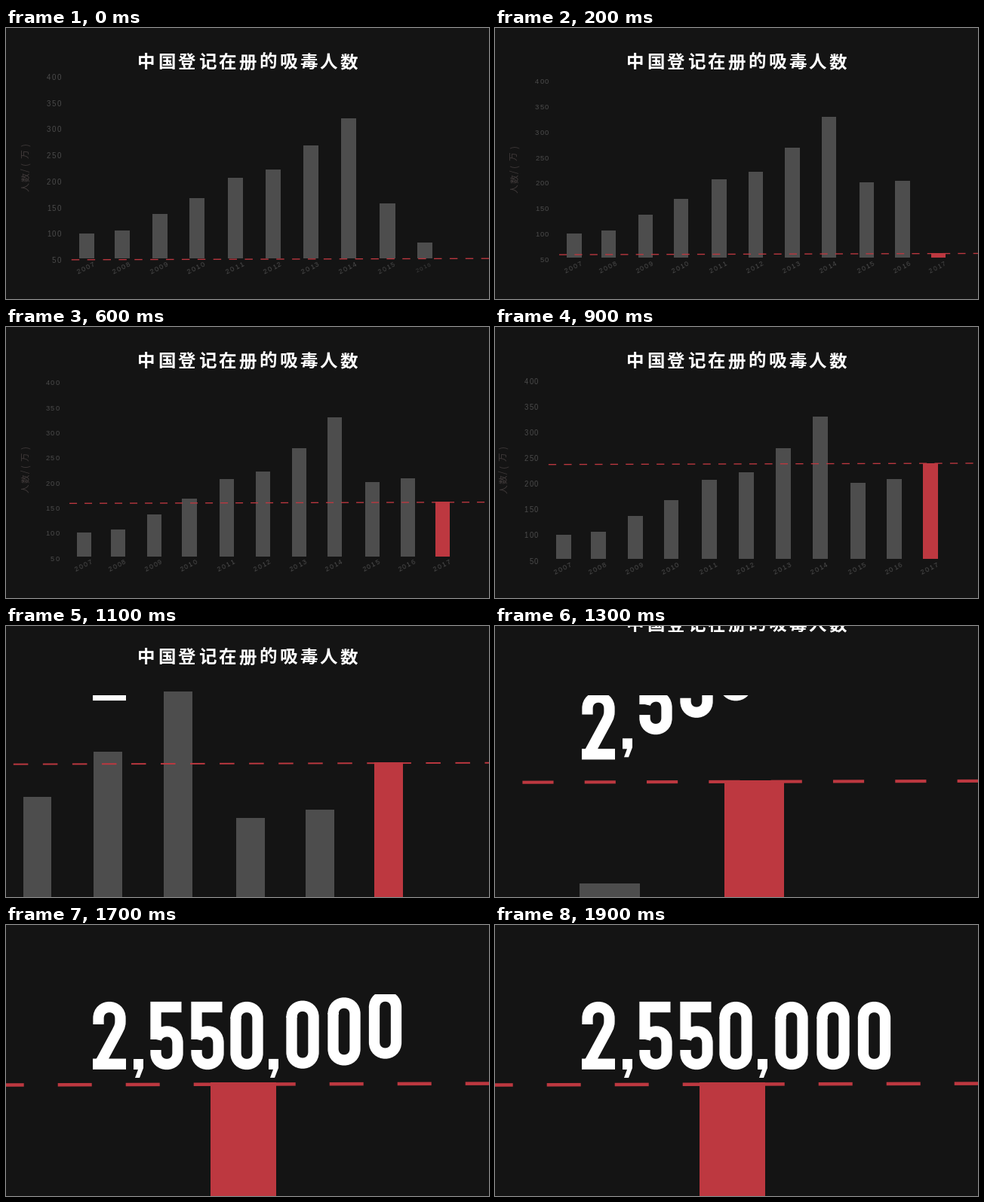
Write a matplotlib script that moves like this. It is 640 px wide and 360 px high and loops after 2 s.

```python
from math import cos, radians, sin

import matplotlib.pyplot as plt
from matplotlib.animation import FuncAnimation
from matplotlib.patches import PathPatch, Polygon, Rectangle
from matplotlib.path import Path

W, H, DPI = 640, 360, 80
PT = 72 / DPI
FRAMES, STEP = 20, 100

BG, GREY, RED, WHITE = "#141414", "#4d4d4d", "#bd3840", "#ffffff"
LABEL, AXIS_NAME = "#4b4b4b", "#403a3a"
SANS, CJK = "Liberation Sans", "Noto Sans CJK JP"

TITLE = "中国登记在册的吸毒人数"
YEARS = range(2007, 2018)
# bar centres from the first bar, and full heights, in chart units
CENTRES = [0, 45, 92.9, 139.4, 188.8, 236.7, 284.6, 332.1, 381.5, 428.5, 475]
HEIGHTS = [31.5, 35.5, 56, 76.5, 102.5, 112.5, 143.5, 184.5, 98.5, 104, 137.4]
BAR_W = 19.3
NAME = list(zip("人数/(万)", (27, 14, 5, -3, -15, -27)))

NUMBER = "2,550,000"
NUMBER_X = [115, 168, 191, 245, 297.5, 347, 371.5, 426.5, 481]
NUMBER_TOP, CLIP_TOP = 102, 92
STROKE = 14.3

fig = plt.figure(figsize=(W / DPI, H / DPI), dpi=DPI, facecolor=BG)
ax = fig.add_axes([0, 0, 1, 1])


def ease(t, start, length, a, b):
    u = min(max((t - start) / length, 0), 1)
    return 1 - (1 - u ** a) ** b


def curve(spec):
    """Build a path from (code, x, y, ...) steps."""
    codes = {"M": [Path.MOVETO], "L": [Path.LINETO], "C": [Path.CURVE4] * 3}
    verts, kinds = [], []
    for code, *xy in spec:
        verts += list(zip(xy[::2], xy[1::2]))
        kinds += codes[code]
    return Path(verts, kinds)


GLYPHS = {
    "0": curve([("M", 7, 22), ("C", 7, 2, 36, 2, 36, 22), ("L", 36, 68),
                ("C", 36, 88, 7, 88, 7, 68), ("L", 7, 21)]),
    "2": curve([("M", 7.5, 30), ("L", 7.5, 22), ("C", 7.5, 2, 36.5, 2, 36.5, 22),
                ("L", 36.5, 26), ("C", 36.5, 34, 33, 38, 30, 44), ("L", 9.5, 82),
                ("M", 0, 82.7), ("L", 44, 82.7)]),
    "5": curve([("M", 41.5, 7), ("L", 7.5, 7), ("L", 7.5, 50),
                ("M", 8, 50), ("C", 11, 36, 36.5, 34, 36.5, 55), ("L", 36.5, 68),
                ("C", 36.5, 88, 7.5, 88, 7.5, 68), ("L", 7.5, 64)]),
}
COMMA = [(1, 76), (14, 76), (14, 88), (9, 101), (3, 101), (7, 90), (1, 90)]


def glyph(x, y, char, size, color, font, **kw):
    kw = {"ha": "center", "va": "center", **kw}
    ax.text(x, y, char, fontsize=size * PT, color=color, family=font, **kw)


def spaced(x, y, text, pitch, size, color, font=SANS, angle=0, **kw):
    """Letter-spaced text centred on x, y."""
    dx, dy = cos(radians(angle)), -sin(radians(angle))
    for k, char in enumerate(text):
        d = (k - (len(text) - 1) / 2) * pitch
        glyph(x + d * dx, y + d * dy, char, size, color, font, rotation=angle, **kw)


def camera(t):
    """Scale, x of the last bar and y of the baseline."""
    settle = max(1 - t / 600, 0) ** 2.5
    s = 1 + 0.044 * settle + 3.5 * ease(t, 800, 700, 3.5, 6)
    x = 577 - 75.5 * (s - 1.022) + 27.8 * settle
    y = 308 + 149.4 * (s - 1.022) - 5.5 * settle
    return s, x, y


def draw_chart(t):
    s, last_x, base = camera(t)
    first_x = last_x - CENTRES[-1] * s

    for i in range(8):
        text = str(50 + 50 * i)
        right = first_x - 32.5 * s
        spaced(right - 3.2 * len(text) * s, base + (3.3 - 33.3 * i) * s, text,
               6.4 * s, 9.3 * s, LABEL)
    for char, dy in NAME:
        glyph(first_x - 77.5 * s, base + (dy - 117.5) * s, char, 11.5 * s,
              AXIS_NAME, CJK, rotation=90)

    for k, (year, cx, full) in enumerate(zip(YEARS, CENTRES, HEIGHTS)):
        x = first_x + cx * s
        pop = ease(t, 100 * k - 960, 400, 1.7, 5.2)
        is_last = year == YEARS[-1]
        grow = ease(t, 0, 1400, 2.53, 6) if is_last else pop
        h = full * grow * s
        if h > 0:
            ax.add_patch(Rectangle((x - BAR_W * s / 2, base - h), BAR_W * s, h,
                                   fc=RED if is_last else GREY, lw=0))
        if pop > 0:
            zoom = (0.8 + 0.2 * pop) * s
            spaced(x - 1.2 * s, base + 12.7 * s, str(year), 6.5 * zoom, 9 * zoom,
                   LABEL, angle=27, alpha=pop ** 0.2)

    # h now holds the height of the last bar
    for n in range(40):
        left = last_x + (20 * n - 494.6) * s
        right = left + 10 * s
        if right < 0 or left > W:
            continue
        ys = [base - h + 0.5 * s - 0.003 * (x - last_x) for x in (left, right)]
        ax.plot([left, right], ys, color=RED, lw=max(s, 1.35) * PT,
                solid_capstyle="butt")


def draw_title(t):
    lift = 70 * min(max((t - 950) / 400, 0), 1) ** 2.9
    if lift < 70:
        spaced(320.3, 53.3 - lift, TITLE, 26.85, 23.5, WHITE, CJK,
               va="baseline", weight="bold")


def draw_number(t):
    window = Rectangle((0, CLIP_TOP), W, H, transform=ax.transData)
    for k, (char, x) in enumerate(zip(NUMBER, NUMBER_X)):
        rise = 120.5 * (1 - ease(t, 1000 + 50 * k, 500, 1.7, 3.9))
        y = NUMBER_TOP - rise
        if char == ",":
            part = Polygon([(x + px, y + py) for px, py in COMMA], fc=WHITE, lw=0)
        else:
            path = GLYPHS[char]
            part = PathPatch(Path(path.vertices + (x, y), path.codes), fc="none",
                             ec=WHITE, lw=STROKE * PT, capstyle="butt",
                             joinstyle="miter")
        part.set_zorder(5)
        ax.add_patch(part)
        part.set_clip_path(window)


def update(i):
    t = i * STEP
    ax.clear()
    ax.set_xlim(0, W)
    ax.set_ylim(H, 0)
    ax.axis("off")
    draw_chart(t)
    draw_title(t)
    draw_number(t)
    return []


anim = FuncAnimation(fig, update, frames=FRAMES, interval=STEP,
                     init_func=lambda: [], repeat=True, repeat_delay=0)
plt.show()
```
